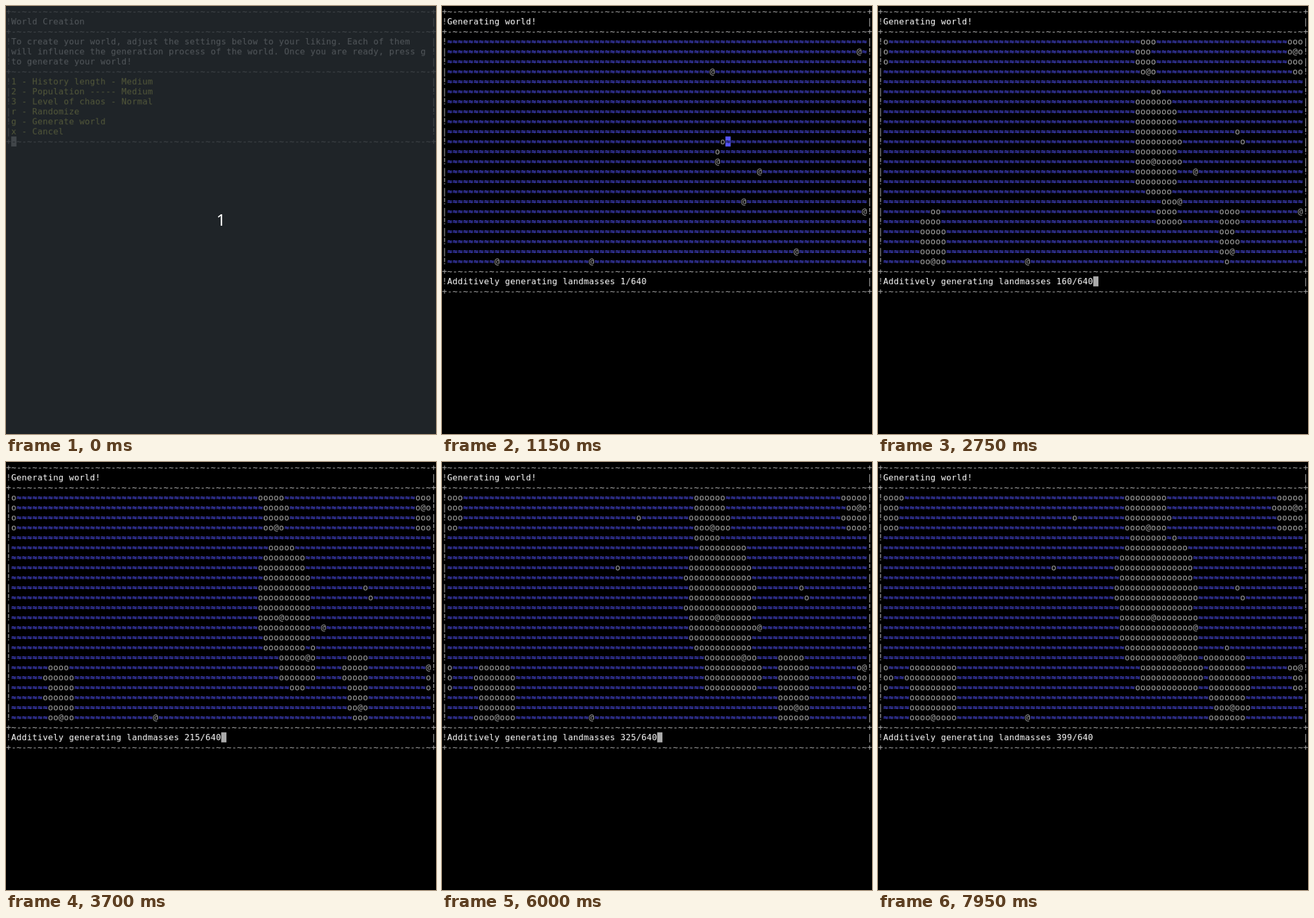
Write an HTML page with a canvas that moves like this. It is 751x746 px and loops after 8 s.

```html
<!DOCTYPE html>
<html lang="en">
<head>
<meta charset="utf-8">
<title>World generation</title>
<style>
html, body { margin: 0; width: 100%; height: 100%; overflow: hidden; background: #000; }
canvas { display: block; }
</style>
</head>
<body>
<canvas id="stage" width="751" height="746"></canvas>
<script>
const W = 751, H = 746, LOOP = 8000, STEP = 50;
const COLS = 82, CELL_W = 10, CELL_H = 19, BASE = 15, SCALE = 11 / 12, TOP = 1;
const GRAY = '#aaaaaa', WHITE = '#ffffff', BLUE = '#5555ff', YELLOW = '#ffff55';
const MAP_W = 80, MAP_H = 23, MAP_TOP = 3, START = 1050, GROW = 1150;

const stage = document.getElementById('stage').getContext('2d');
stage.imageSmoothingQuality = 'high';

// The terminal is drawn on whole pixels, then scaled onto the stage.
const term = document.createElement('canvas');
term.width = COLS * CELL_W;
term.height = Math.ceil(H / SCALE);
const ctx = term.getContext('2d');

const intro = [
  'To create your world, adjust the settings below to your liking. Each of them',
  'will influence the generation process of the world. Once you are ready, press g',
  'to generate your world!'
];
const options = [
  '1 - History length - Medium',
  '2 - Population ----- Medium',
  '3 - Level of chaos - Normal',
  'r - Randomize',
  'g - Generate world',
  'x - Cancel'
];

const seeds = [
  [79, 4], [51, 6], [52, 15], [60, 16], [57, 19], [80, 20], [67, 24], [10, 25], [28, 25]
];

// Landmasses: centre column and row, radii, and how late each starts to grow.
const masses = [
  [52.6, 13.3, 7.7, 6.5, 0],
  [50.4, 4.6, 4.4, 3, 0.2],
  [55, 20, 6.5, 2.8, 0.25],
  [9.8, 22.7, 4.6, 3.5, 0.05],
  [66.4, 22, 3.8, 4, 0.12],
  [79.5, 4, 4.3, 2.8, 0.12],
  [80, 21, 2, 1.8, 0.4],
  [68, 12, 0.5, 0.5, 0.2],
  [69, 13, 0.5, 0.5, 0.2],
  [33, 10, 0.5, 0.5, 0.7],
  [37, 5, 0.5, 0.5, 0.7]
];

let state = 7;
function random() {
  state = (state * 16807) % 2147483647;
  return state / 2147483647;
}

// Low scores turn to land first; the map wraps around sideways.
function score(x, y, [cx, cy, rx, ry, wait]) {
  const dx = (x - cx + MAP_W * 1.5) % MAP_W - MAP_W / 2, dy = y - cy;
  const reach = (dx / rx) ** 2 + (dy / ry) ** 6 + Math.hypot(dx, dy) * 0.01;
  return wait + (1 - wait) * reach;
}

const land = [];
for (let y = MAP_TOP; y < MAP_TOP + MAP_H; y++) {
  for (let x = 1; x <= MAP_W; x++) {
    if (seeds.some(s => s[0] === x && s[1] === y)) continue;
    const best = Math.min(...masses.map(m => score(x, y, m)));
    land.push({ x, y, order: best * (0.8 + 0.4 * random()) });
  }
}
land.sort((a, b) => a.order - b.order);

// The counter passes these points, slowing as a power of elapsed time.
const marks = [[GROW, 1], [2750, 160], [4650, 263], [6000, 325], [7950, 399]];
const ease = t => ((t - GROW) / 1000) ** 0.633;

function counter(t) {
  if (t < GROW) return 0;
  const i = marks.findIndex(m => t < m[0]);
  if (i < 0) return marks[marks.length - 1][1];
  const [t0, n0] = marks[i - 1], [t1, n1] = marks[i];
  return Math.floor(n0 + (n1 - n0) * (ease(t) - ease(t0)) / (ease(t1) - ease(t0)));
}

function put(text, col, row, color) {
  ctx.fillStyle = color;
  [...text].forEach((ch, i) => {
    if (ch !== ' ') ctx.fillText(ch, (col + i) * CELL_W, row * CELL_H + BASE);
  });
}

function rule(row, odd) {
  put('+' + (odd ? '-~' : '~-').repeat(MAP_W / 2) + '+', 0, row, GRAY);
}

function section(row, lines, color) {
  lines.forEach((line, i) => {
    put(i % 2 ? '|' : '!', 0, row + i, GRAY);
    put(i % 2 ? '!' : '|', COLS - 1, row + i, GRAY);
    put(line, 1, row + i, color);
  });
}

function cursor(col, row, ch, color) {
  ctx.fillStyle = color;
  ctx.fillRect(col * CELL_W, row * CELL_H, CELL_W, CELL_H);
  put(ch, col, row, '#000');
}

function drawMenu(blinkOn) {
  rule(0, false);
  section(1, ['World Creation'], WHITE);
  rule(2, true);
  section(3, intro, WHITE);
  rule(6, false);
  section(7, options, YELLOW);
  rule(13, true);
  if (blinkOn) cursor(1, 13, '-', GRAY);
}

function drawWorld(t) {
  const n = counter(t);
  const grown = land.slice(0, n ? n + 1 : 0);
  const sea = Array.from({ length: MAP_H }, () => Array(MAP_W).fill('≈'));
  const solid = [...seeds.map(([x, y]) => ({ x, y, ch: '@' })),
                 ...grown.map(c => ({ ...c, ch: 'o' }))];
  for (const c of solid) sea[c.y - MAP_TOP][c.x - 1] = ' ';

  rule(0, false);
  section(1, ['Generating world!'], WHITE);
  rule(2, true);
  section(MAP_TOP, sea.map(row => row.join('')), BLUE);
  for (const c of solid) put(c.ch, c.x, c.y, GRAY);

  const end = MAP_TOP + MAP_H;
  const status = `Additively generating landmasses ${n}/640`;
  rule(end, false);
  section(end + 1, [status], WHITE);
  rule(end + 2, true);

  if ((t - START) % 1200 < 600) {
    if (n === 1) cursor(grown[0].x + 1, grown[0].y, '≈', BLUE);
    else cursor(status.length + 1, end + 1, ' ', GRAY);
  }
}

function drawCountdown() {
  stage.fillStyle = 'rgba(39, 45, 51, 0.8)';
  stage.fillRect(0, 0, W, H);
  stage.fillStyle = WHITE;
  stage.font = '28px "Noto Sans", "Open Sans", sans-serif';
  stage.textAlign = 'center';
  stage.fillText('1', W / 2, 383);
}

function draw(t) {
  ctx.fillStyle = '#000';
  ctx.fillRect(0, 0, term.width, term.height);
  ctx.font = '16px "DejaVu Sans Mono", monospace';
  if (t < START) drawMenu(t < 300 || t >= 900);
  else drawWorld(t);

  stage.fillStyle = '#000';
  stage.fillRect(0, 0, W, H);
  stage.drawImage(term, 0, TOP, term.width * SCALE, term.height * SCALE);
  if (t < STEP) drawCountdown();
}

let last = -1;
const begin = performance.now();
function tick() {
  const now = (performance.now() - begin) % LOOP;
  const t = Math.floor(now / STEP) * STEP;
  if (t !== last) draw(last = t);
  requestAnimationFrame(tick);
}
tick();
</script>
</body>
</html>
```
